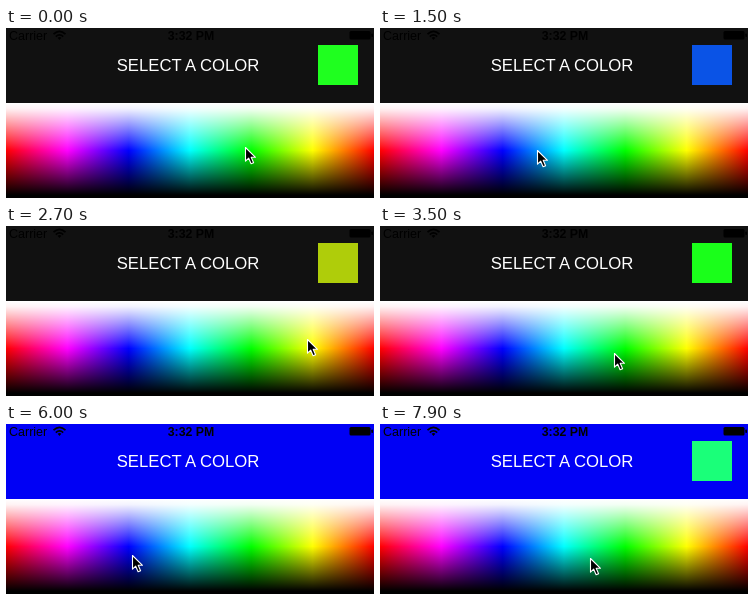
An HTML page for the animation above (8 s loop, 368 by 170 pixels).

```html
<!DOCTYPE html>
<html lang="en">
<head>
<meta charset="utf-8">
<title>Color picker</title>
<style>
  html, body { margin: 0; width: 100%; height: 100%; overflow: hidden; background: #000; }
  svg { display: block; width: 368px; height: 170px; }
  text { font-family: "Liberation Sans", Arial, sans-serif; }
</style>
</head>
<body>
<svg viewBox="0 0 368 170">
  <defs>
    <linearGradient id="hues">
      <stop offset="0" stop-color="#f00"/>
      <stop offset=".1667" stop-color="#f0f"/>
      <stop offset=".3333" stop-color="#00f"/>
      <stop offset=".5" stop-color="#0ff"/>
      <stop offset=".6667" stop-color="#0f0"/>
      <stop offset=".8333" stop-color="#ff0"/>
      <stop offset="1" stop-color="#f00"/>
    </linearGradient>
    <linearGradient id="shade" x2="0" y2="1">
      <stop offset="0" stop-color="#fff"/>
      <stop offset=".06" stop-color="#fff" stop-opacity=".95"/>
      <stop offset=".5" stop-color="#fff" stop-opacity="0"/>
      <stop offset=".5" stop-color="#000" stop-opacity="0"/>
      <stop offset=".97" stop-color="#000"/>
    </linearGradient>
  </defs>

  <rect id="header" width="368" height="75"/>
  <text x="3" y="12" font-size="12.5">Carrier</text>
  <g fill="none" stroke="#000" stroke-width="1.7">
    <path d="M47.5 6.2q6-5.6 12 0M49.8 8.6q3.7-3.4 7.4 0"/>
    <path d="M51.6 9.8q1.9-1.6 3.8 0l-1.9 2.2z" fill="#000" stroke="none"/>
  </g>
  <text x="185" y="12" font-size="12.3" font-weight="bold" text-anchor="middle">3:32 PM</text>
  <rect x="343.5" y="3" width="21" height="8.5" rx="1.5"/>
  <rect x="365.3" y="5.5" width="1.7" height="3.5" rx=".8"/>
  <text x="182" y="43" font-size="16.7" fill="#fff" text-anchor="middle">SELECT A COLOR</text>
  <rect id="swatch" x="312" y="17" width="40" height="40"/>

  <rect y="75" width="368" height="95" fill="url(#hues)"/>
  <rect y="75" width="368" height="95" fill="url(#shade)"/>
  <path id="cursor" d="M.5 .5V14.2L3.7 11.2L6.1 16.8L8.6 15.7L6.2 10.3H10.5Z"
    fill="#000" stroke="#fff" stroke-width="1.1" stroke-linejoin="round"/>
</svg>
<script>
const LOOP = 8000, STEP = 100, TAP = 6000;
const [header, swatch, cursor] = ['header', 'swatch', 'cursor'].map(id => document.getElementById(id));

// time, cursor x, cursor y, hue, saturation, lightness
const keys = [
  [0, 239, 119, 120, 100, 56],
  [1150, 129, 123, 237, 98, 49],
  [1500, 157, 122, 220, 92, 47],
  [2700, 301, 113, 69, 91, 42],
  [3500, 234, 127, 120, 100, 55],
  [4600, 127, 123, 240, 100, 48],
  [5400, 126, 131, 240, 100, 48],
  [6800, 126, 131, 240, 100, 48],
  [7500, 238, 133, 122, 100, 55],
  [7900, 210, 134, 145, 100, 55]
];

// Slope is zero at turning points, so the curve never overshoots.
function slope(i, c) {
  const a = keys[i - 1], b = keys[i], d = keys[i + 1];
  if (!a || !d) return 0;
  const left = (b[c] - a[c]) / (b[0] - a[0]);
  const right = (d[c] - b[c]) / (d[0] - b[0]);
  return left * right > 0 ? 2 * left * right / (left + right) : 0;
}

function sample(t, c) {
  const last = keys.length - 1;
  if (t >= keys[last][0]) return keys[last][c];
  const i = keys.findIndex(k => k[0] > t) - 1;
  const a = keys[i], b = keys[i + 1], span = b[0] - a[0];
  const u = (t - a[0]) / span, v = 1 - u;
  return v * v * (1 + 2 * u) * a[c] + u * u * (3 - 2 * u) * b[c]
    + span * u * v * (v * slope(i, c) - u * slope(i + 1, c));
}

function draw(now) {
  const t = Math.floor((now % LOOP) / STEP) * STEP;
  const [x, y, h, s, l] = [1, 2, 3, 4, 5].map(c => sample(t, c));
  cursor.setAttribute('transform', `translate(${Math.round(x)} ${Math.round(y)})`);
  swatch.setAttribute('fill', `hsl(${h}, ${s}%, ${l}%)`);
  header.setAttribute('fill', t < TAP ? '#111' : 'hsl(240, 100%, 48%)');
}

function tick() {
  draw(performance.now());
  requestAnimationFrame(tick);
}
tick();
</script>
</body>
</html>
```
